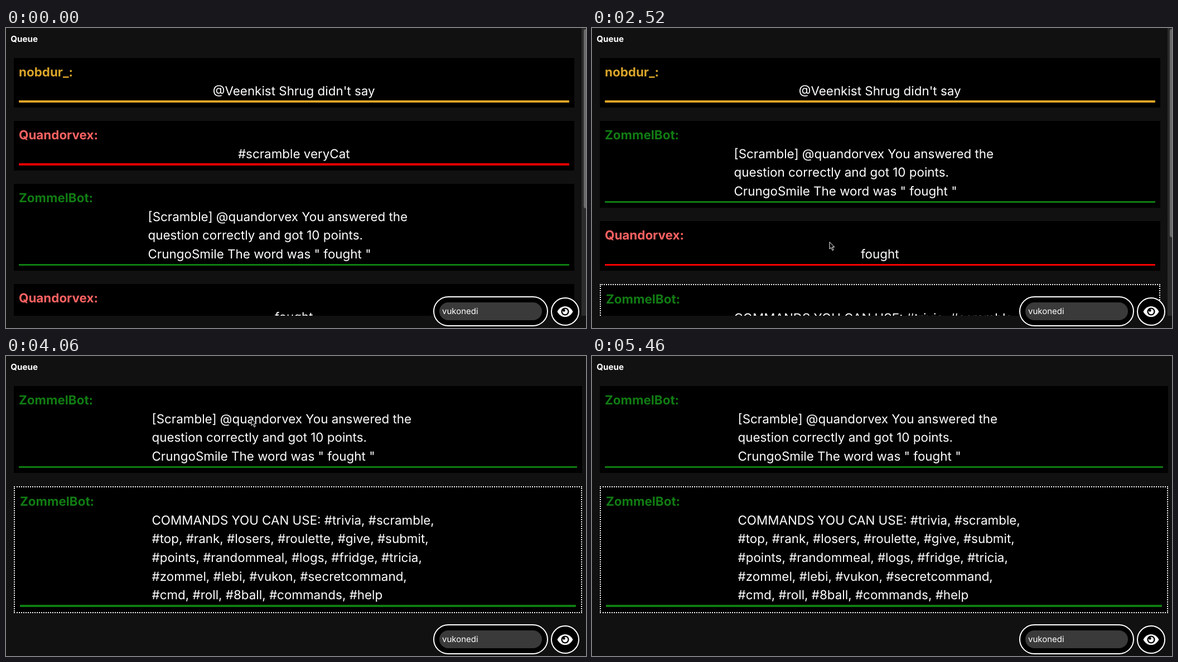
Write an HTML page that moves like this. It is 1040x539 px and loops after 5670 ms.

```html
<!DOCTYPE html>
<html lang="en">
<head>
<meta charset="utf-8">
<title>Queue</title>
<style>
  html, body { margin: 0; width: 100%; height: 100%; overflow: hidden; background: #111; }
  body { position: relative; color: #fff; font: 22.4px/33.6px Inter, sans-serif;
    font-optical-sizing: none; text-rendering: geometricPrecision; }
  #view { position: absolute; inset: 0 0 auto; height: 516.5px; overflow: hidden; }
  h1 { position: absolute; left: 8.3px; top: 8px; margin: 0; font-size: 15.2px; line-height: 24px; }
  #list { display: flow-root; margin: 54px 21.5px 0 14px; }
  #list.wide { margin-right: 7.5px; }
  .card { padding: 9px; margin-bottom: 23.8px; background: #000; }
  .card.marked { border: 2px dotted #fff; }
  .name { font-weight: 700; }
  .message { width: fit-content; margin: 0 auto; white-space: pre; }
  .message.long { width: 523.5px; }
  .bar { height: 3.5px; margin: .3px 0 .2px; border-radius: 1px; }
  #track { position: absolute; right: 0; top: 0; width: 8px; height: 100%; background: #2b2b2b; }
  #thumb { position: absolute; left: 4px; top: 2px; width: 8px; border-radius: 4px; background: #6b6b6b; }
  #pill, #eye { position: absolute; box-sizing: border-box; border: 2px solid #fff; background: #000; }
  #pill { left: 766px; top: 482px; width: 206px; height: 54px; border-radius: 27px; }
  #channel { position: absolute; left: 9px; top: 9px; width: 179px; height: 32px; padding-left: 5px;
    border-radius: 16px; background: #3a3a3a; font-size: 15px; line-height: 32px; }
  #eye { left: 977px; top: 484px; width: 51px; height: 51px; border-radius: 50%; }
  #eye svg { position: absolute; left: 0; top: 0; }
  #cursor { position: absolute; left: 0; top: 0; overflow: visible; }
</style>
</head>
<body>
<div id="view">
  <h1>Queue</h1>
  <div id="list"></div>
  <div id="track"><div id="thumb"></div></div>
</div>
<div id="pill"><div id="channel">vukonedi</div></div>
<div id="eye">
  <svg width="47" height="47" viewBox="-23.5 -23.5 47 47">
    <path d="M-14 0C-11-6-6-9.6 0-9.6S11-6 14 0C11 6 6 9.6 0 9.6S-11 6-14 0Z" fill="#fff"/>
    <circle r="7.1"/>
    <circle r="4.8" fill="#fff"/>
    <circle cx="-2.1" cy="-2.1" r="2.3"/>
  </svg>
</div>
<svg id="cursor" width="11" height="18">
  <path d="M.5.5V13L3.3 10.4 5.5 15.6 7.6 14.7 5.4 9.6H9.3Z" fill="#000" stroke="#fff"/>
</svg>
<script>
const LOOP = 5670, STEP = 70;
const $ = id => document.getElementById(id);

const users = {
  nobdur_: { color: '#daa52a', bar: '#e0a428' },
  Quandorvex: { color: '#ff6262', bar: '#f40000' },
  ZommelBot: { color: '#117c13', bar: '#0f7d12' },
};

// until: the moment the message leaves the queue
const messages = [
  { user: 'nobdur_', until: 4060, text: "@Veenkist Shrug didn't say" },
  { user: 'Quandorvex', until: 1820, text: '#scramble veryCat' },
  { user: 'ZommelBot', until: LOOP, text:
`[Scramble] @quandorvex You answered the
question correctly and got 10 points.
CrungoSmile The word was " fought "` },
  { user: 'Quandorvex', until: 3010, text: 'fought' },
  { user: 'ZommelBot', until: LOOP, marked: true, text:
`COMMANDS YOU CAN USE: #trivia, #scramble,
#top, #rank, #losers, #roulette, #give, #submit,
#points, #randommeal, #logs, #fridge, #tricia,
#zommel, #lebi, #vukon, #secretcommand,
#cmd, #roll, #8ball, #commands, #help` },
];

// The pointer rests at the end of each eased move until the next one starts.
const moves = [
  move(490, 1050, 'M8 517C200 440 400 330 480 261'),
  move(1120, 1680, 'M443 219C640 110 500 420 388 221.5'),
  move(2030, 2380, 'M388 221.5C420 330 450 430 425.5 384'),
  move(3010, 3780, 'M425.5 384Q440 250 439.5 112'),
  move(4410, 5040, 'M439.5 112L935 441'),
  move(5040, 5460, 'M935 441C1000 470 850 530 710 532'),
];

function move(start, end, d) {
  const curve = document.createElementNS('http://www.w3.org/2000/svg', 'path');
  curve.setAttribute('d', d);
  return { start, end, curve, length: curve.getTotalLength() };
}

function add(parent, className, text = '') {
  const el = document.createElement('div');
  el.className = className;
  el.textContent = text;
  return parent.appendChild(el);
}

for (const m of messages) {
  const { color, bar } = users[m.user];
  m.el = add($('list'), m.marked ? 'card marked' : 'card');
  add(m.el, 'name', m.user + ':').style.color = color;
  add(m.el, m.text.includes('\n') ? 'message long' : 'message', m.text);
  add(m.el, 'bar').style.background = bar;
}

function renderQueue(t) {
  for (const m of messages) m.el.style.display = t < m.until ? '' : 'none';
  const list = $('list'), view = $('view').clientHeight;
  const content = list.offsetTop + list.offsetHeight;
  const fits = content <= view;
  list.classList.toggle('wide', fits);
  $('track').style.display = fits ? 'none' : '';
  $('thumb').style.height = view * view / content - 2 + 'px';
}

function renderCursor(t) {
  const current = moves.findLast(m => m.start <= t);
  const visible = current && t < moves.at(-1).end;
  $('cursor').style.display = visible ? '' : 'none';
  if (!visible) return;
  const k = Math.min(1, (t - current.start) / (current.end - current.start));
  const tip = current.curve.getPointAtLength(current.length * k * k * (3 - 2 * k));
  $('cursor').style.transform = `translate(${tip.x}px, ${tip.y}px)`;
}

const start = performance.now();
function tick() {
  const elapsed = (performance.now() - start) % LOOP;
  const t = Math.floor(elapsed / STEP) * STEP;
  renderQueue(t);
  renderCursor(t);
  requestAnimationFrame(tick);
}
tick();
</script>
</body>
</html>
```
